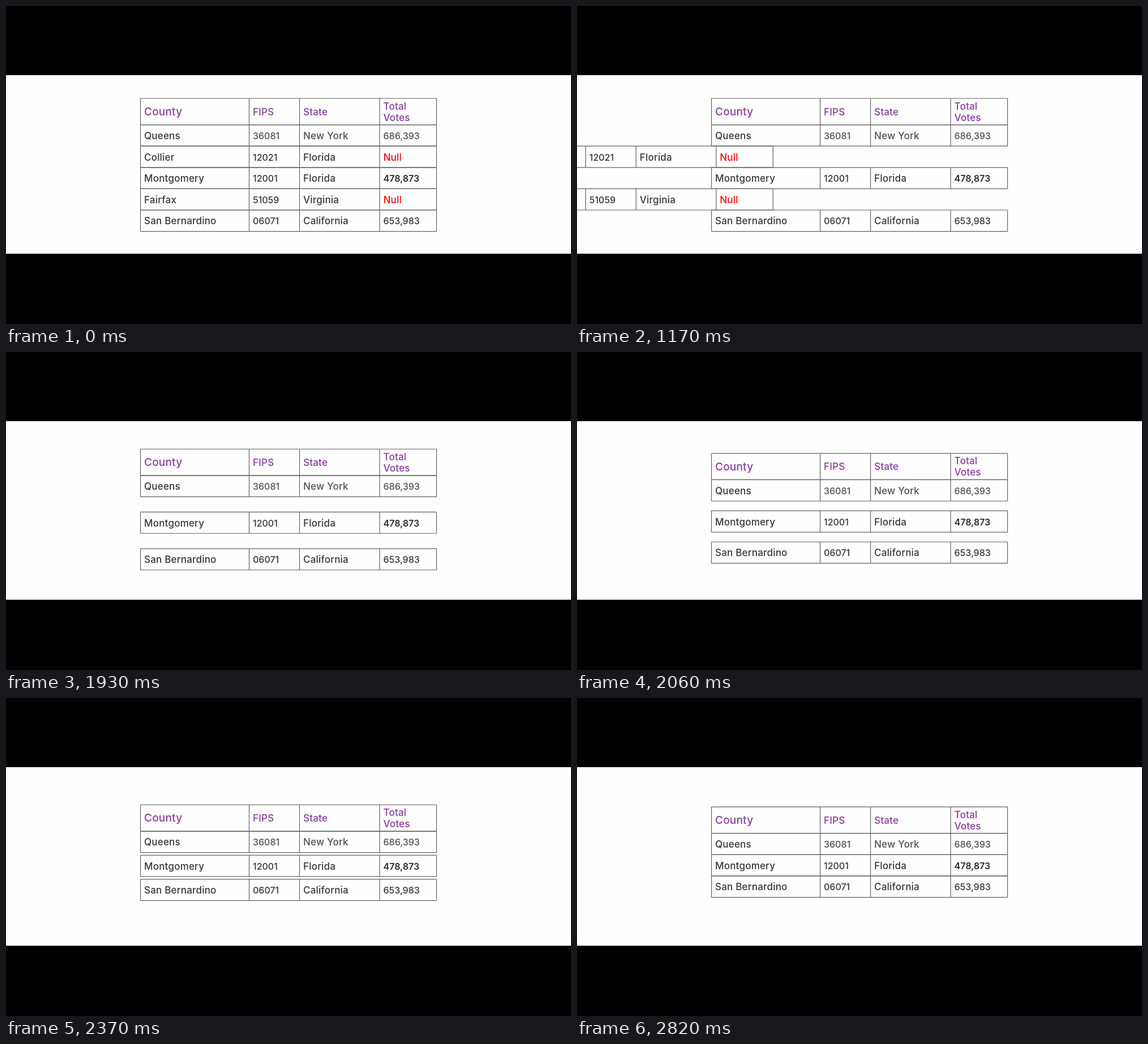
Animation, 998 px wide and 561 px high, one loop 3.34 s. Source, as an HTML page:

```html
<!DOCTYPE html>
<html lang="en">
<head>
<meta charset="utf-8">
<title>Dropping null rows</title>
<style>
  html, body { margin: 0; width: 100%; height: 100%; overflow: hidden; background: #000; }
  svg { display: block; }
  text { font: 500 17px Inter, "Open Sans", sans-serif; letter-spacing: .2px; fill: #363636; }
  .num { font-size: 16px; letter-spacing: 0; }
  .head { fill: #8a3c9e; }
  .big { font-size: 19px; }
  .soft { fill: #505050; }
  .bold { font-weight: 600; fill: #2b2b2b; }
  .null { fill: #f8080c; }
  path { fill: none; stroke: #626262; stroke-width: 1.2; }
</style>
</head>
<body>
<svg id="stage" width="998" height="561" viewBox="0 0 998 561">
  <rect width="998" height="561" fill="#000"/>
  <rect y="122" width="998" height="315" fill="#fdfefd"/>
</svg>
<script>
const LOOP = 3340, TICK = 34.45, FIRST = 890;
const COLS = [237.5, 429.5, 518.5, 660, 760.5];
const TOP = 163, HEAD = 46.6, ROW = 37.6;

// cells are [text, class]; dx and dy are the distances each row travels
const ROWS = [
  { dy: 29.1, cells: [['Queens'], ['36081', 'num soft'], ['New York', 'soft'], ['686,393', 'num soft']] },
  { dx: -1125, cells: [['Collier'], ['12021', 'num'], ['Florida'], ['Null', 'null']] },
  { dy: -8.5, cells: [['Montgomery'], ['12001', 'num'], ['Florida'], ['478,873', 'num bold']] },
  { dx: -1125, cells: [['Fairfax'], ['51059', 'num'], ['Virginia'], ['Null', 'null']] },
  { dy: -46, cells: [['San Bernardino'], ['06071', 'num'], ['California'], ['653,983', 'num']] }
];

const stage = document.getElementById('stage');

function add(parent, tag, attrs = {}, text = '') {
  const el = document.createElementNS('http://www.w3.org/2000/svg', tag);
  for (const key in attrs) el.setAttribute(key, attrs[key]);
  el.textContent = text;
  parent.appendChild(el);
  return el;
}

function label(g, col, y, text, cls = '') {
  add(g, 'text', { x: COLS[col] + 6.5, y, class: cls }, text);
}

function grid(y, h) {
  const g = add(stage, 'g');
  const left = COLS[0], right = COLS[4];
  const bars = COLS.map(x => `M${x} ${y}v${h}`).join('');
  add(g, 'path', { d: `M${left} ${y}H${right}M${left} ${y + h}H${right}${bars}` });
  return g;
}

const header = grid(TOP, HEAD);
label(header, 0, 193, 'County', 'head big');
label(header, 1, 192.5, 'FIPS', 'head');
label(header, 2, 192.5, 'State', 'head');
label(header, 3, 182.5, 'Total', 'head');
label(header, 3, 202.5, 'Votes', 'head');

const movers = [{ g: header, dy: ROWS[0].dy }];
ROWS.forEach(({ dx, dy, cells }, i) => {
  const y = TOP + HEAD + i * ROW;
  const g = grid(y, ROW);
  cells.forEach(([text, cls], col) => label(g, col, y + 25.4, text, cls));
  movers.push({ g, dx, dy });
});

// cubic-bezier(.25, .1, .25, 1), solved by bisection
function ease(x) {
  if (x <= 0) return 0;
  if (x >= 1) return 1;
  let lo = 0, hi = 1;
  for (let i = 0; i < 24; i++) {
    const s = (lo + hi) / 2;
    if (.75 * s * (1 - s) + s ** 3 < x) lo = s; else hi = s;
  }
  return .3 * lo * (1 - lo) ** 2 + 3 * lo * lo * (1 - lo) + lo ** 3;
}

function draw(now) {
  const time = now % LOOP;
  const t = FIRST + Math.floor((time - FIRST) / TICK + .12) * TICK;
  const slide = ease((t - 900) / 1145);
  const close = ease((t - 1700) / 1145);
  for (const { g, dx = 0, dy = 0 } of movers) {
    g.setAttribute('transform', `translate(${dx * slide} ${dy * close})`);
  }
}

const start = performance.now();
function loop() {
  draw(performance.now() - start);
  requestAnimationFrame(loop);
}
loop();
</script>
</body>
</html>
```
